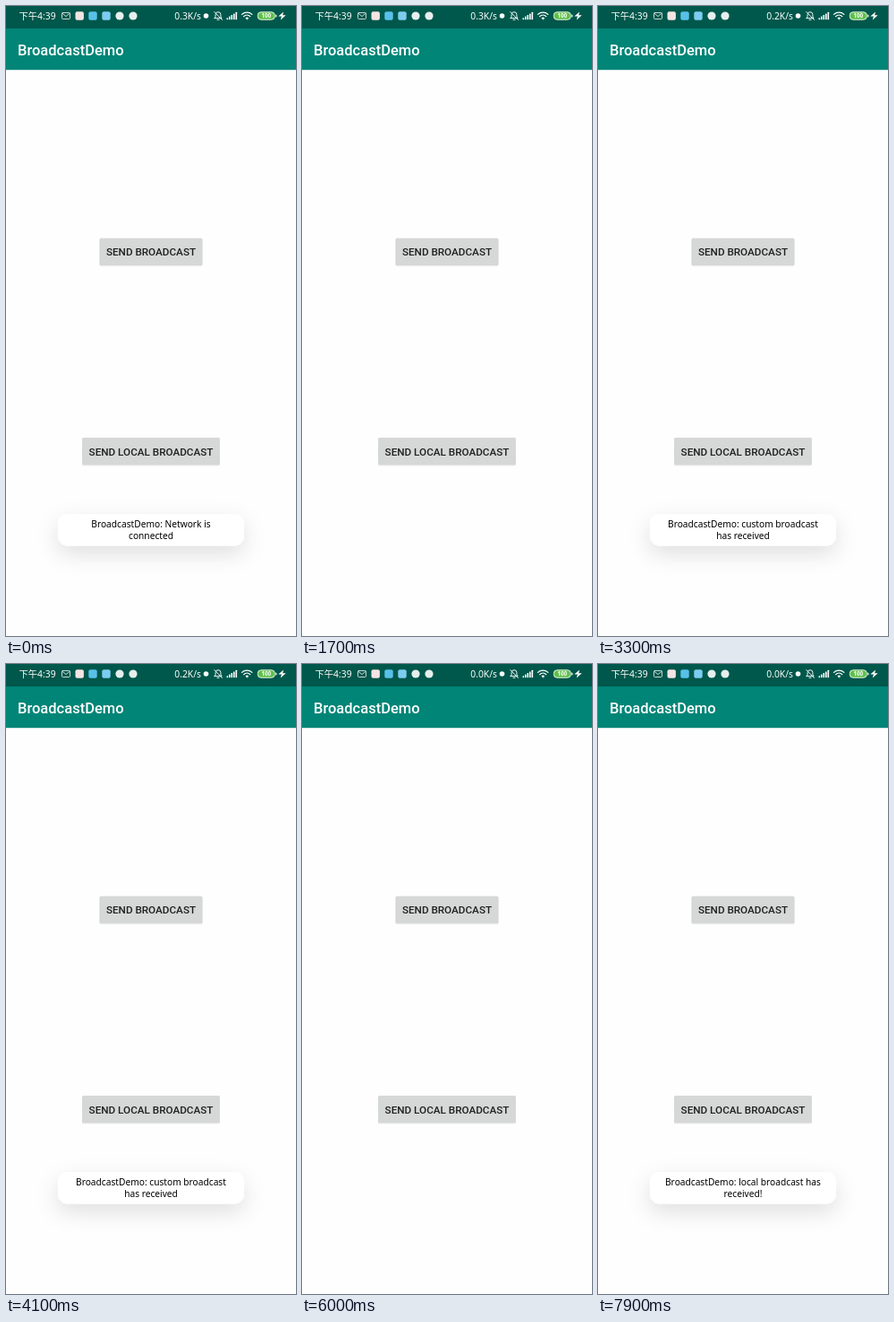
Animation, 324 px wide and 702 px high, one loop 8000 ms. Source, as an HTML page:

```html
<!DOCTYPE html>
<html lang="zh-CN">
<head>
<meta charset="utf-8">
<title>BroadcastDemo</title>
<style>
  html, body { margin: 0; width: 100%; height: 100%; overflow: hidden; background: #fefefe; }
  svg { display: block; width: 100%; height: 100%; }
  .status { font: 500 10.3px "Noto Sans", "Noto Sans CJK SC", sans-serif; fill: #fff; }
  .title { font: 500 16.5px Roboto, sans-serif; fill: #fff; }
  .label { font: 500 11.7px Roboto, sans-serif; fill: #1f1f1f; text-anchor: middle; }
  .toast text { font: 10.2px "Noto Sans", sans-serif; fill: #000; text-anchor: middle; }
  .line { fill: none; stroke: #fff; stroke-linecap: round; stroke-linejoin: round; }
</style>
</head>
<body>
<svg viewBox="0 0 324 702">
  <defs>
    <filter id="lift" x="-30%" y="-100%" width="160%" height="350%">
      <feDropShadow dx="0" dy="9" stdDeviation="12" flood-color="#000" flood-opacity=".12"/>
    </filter>
    <filter id="edge" x="-5%" y="-15%" width="110%" height="140%">
      <feDropShadow dx="0" dy=".4" stdDeviation=".5" flood-color="#000" flood-opacity=".15"/>
    </filter>
  </defs>

  <rect width="324" height="702" fill="#fefefe"/>
  <rect width="324" height="25" fill="#00574b"/>
  <rect y="25" width="324" height="46.2" fill="#008577"/>
  <text class="title" x="13" y="55">BroadcastDemo</text>

  <!-- status bar, left -->
  <text class="status" x="14.5" y="14.5">下午4:39</text>
  <g class="line" stroke-width=".9" opacity=".85">
    <rect x="62.5" y="7.5" width="9" height="7" rx="1"/>
    <path d="M63 8.3 67 11.6 71 8.3"/>
  </g>
  <rect x="77.5" y="6.3" width="9.4" height="9.4" rx="2" fill="#f4e4e4"/>
  <rect x="92.3" y="6.3" width="9.4" height="9.4" rx="2" fill="#58c1ea"/>
  <rect x="107.3" y="6.3" width="9.4" height="9.4" rx="2" fill="#7ccdf0"/>
  <circle cx="127" cy="11" r="4.6" fill="#e6efed"/>
  <circle cx="142" cy="11" r="4.6" fill="#e6efed"/>

  <!-- status bar, right -->
  <text class="status" id="speed" x="188.3" y="14.5"></text>
  <circle cx="223.5" cy="11" r="2.8" fill="#fff"/>
  <g class="line" stroke-width=".95">
    <path d="M233 13.6H241L239.9 12V9.6A2.9 2.9 0 0 0 234.1 9.6V12ZM236 15.3H238M232.8 6.6 241.6 15.5"/>
  </g>
  <g id="bars" fill="#fff"></g>
  <g class="line" stroke-width="1.3">
    <path d="M263.5 9.4A8.2 8.2 0 0 1 274.9 9.4M265.6 11.6A5.2 5.2 0 0 1 272.8 11.6"/>
    <path d="M269.2 15 267.8 13.4A2 2 0 0 1 270.6 13.4Z" fill="#fff" stroke-width=".6"/>
  </g>
  <rect x="281.3" y="6.8" width="19" height="8.4" rx="3.6" fill="#5fc04a" stroke="#e8f6e6" stroke-width="1"/>
  <rect x="301.2" y="9.5" width="1.2" height="3" rx=".6" fill="#fff"/>
  <text class="status" x="290.8" y="13.3" text-anchor="middle" style="font-size:6.3px;font-weight:600">100</text>
  <path d="M310.1 6.5 304.3 11.6H307.9L306.7 15.5 312.7 10.2H309.1Z" fill="#fff"/>

  <g id="buttons"></g>
  <g id="toasts"></g>
</svg>
<script>
const LOOP = 8000, STEP = 100;
const NS = "http://www.w3.org/2000/svg";
const byId = id => document.getElementById(id);

function add(parent, tag, attrs = {}, text = "") {
  const el = document.createElementNS(NS, tag);
  for (const k in attrs) el.setAttribute(k, attrs[k]);
  el.textContent = text;
  return parent.appendChild(el);
}

// rows: [time, value, value, ...]; linear between rows, clamped at the ends
function sample(rows, t) {
  if (t <= rows[0][0]) return rows[0].slice(1);
  for (let i = 1; i < rows.length; i++) {
    const a = rows[i - 1], b = rows[i];
    if (t <= b[0]) {
      const p = (t - a[0]) / (b[0] - a[0]);
      return a.slice(1).map((v, k) => v + (b[k + 1] - v) * p);
    }
  }
  return rows[rows.length - 1].slice(1);
}

// scale, opacity
const ENTER = [[0, .45, 0], [50, .54, .4], [150, .85, .85], [250, .97, 1], [350, 1, 1]];
const LEAVE = [[0, 1, 1], [200, .92, .25], [240, .91, .12], [280, .9, 0]];
// radius, opacity
const RIPPLE = [[0, 8, 0], [50, 28, .14], [250, 87, .17], [350, 118, .14], [600, 160, 0]];
const SPEEDS = [[0, "0.3K/s"], [3200, "0.2K/s"], [6000, "0.0K/s"]];

for (let i = 0; i < 5; i++) {
  const h = 2 + i * 1.6;
  add(byId("bars"), "rect", { x: 246.5 + i * 2.5, y: 15.2 - h, width: 1.6, height: h, rx: .4 });
}

const buttons = [
  { text: "SEND BROADCAST", x: 104.5, y: 258.8, w: 115, h: 30.5, touch: 150, press: 2550 },
  { text: "SEND LOCAL BROADCAST", x: 85, y: 481, w: 154, h: 30.5, touch: 139, press: 6550 }
];
buttons.forEach((b, i) => {
  const g = add(byId("buttons"), "g");
  const box = { x: b.x, y: b.y, width: b.w, height: b.h, rx: 1.6 };
  add(add(g, "clipPath", { id: "clip" + i }), "rect", box);
  add(g, "rect", { ...box, fill: "#d6d7d7", filter: "url(#edge)" });
  b.ripple = add(g, "circle", { cx: b.touch, cy: b.y + b.h / 2, "clip-path": `url(#clip${i})` });
  add(g, "text", { class: "label", x: 162, y: b.y + 19.5 }, b.text);
});

const toasts = [
  { lines: ["BroadcastDemo: Network is", "connected"], start: -1500, end: 700 },
  { lines: ["BroadcastDemo: custom broadcast", "has received"], start: 2750, end: 4960 },
  { lines: ["BroadcastDemo: local broadcast has", "received!"], start: 6750, end: 9000 }
];
for (const m of toasts) {
  m.el = add(byId("toasts"), "g", { class: "toast" });
  add(m.el, "rect", { x: 58, y: 566, width: 208, height: 35.5, rx: 11, fill: "#fff", filter: "url(#lift)" });
  m.lines.forEach((s, i) => add(m.el, "text", { x: 162, y: 580.7 + i * 13 }, s));
}

function draw(t) {
  byId("speed").textContent = SPEEDS.filter(s => s[0] <= t).pop()[1];
  for (const b of buttons) {
    const [r, alpha] = sample(RIPPLE, t - b.press);
    b.ripple.setAttribute("r", r);
    b.ripple.setAttribute("opacity", alpha);
  }
  for (const m of toasts) {
    const [k, alpha] = t < m.end ? sample(ENTER, t - m.start) : sample(LEAVE, t - m.end);
    m.el.setAttribute("transform", `translate(162 631) scale(${k}) translate(-162 -631)`);
    m.el.setAttribute("opacity", alpha);
  }
}

const origin = performance.now();
function tick() {
  const t = (performance.now() - origin) % LOOP;
  draw(Math.floor(t / STEP) * STEP);
  requestAnimationFrame(tick);
}
tick();
</script>
</body>
</html>
```
